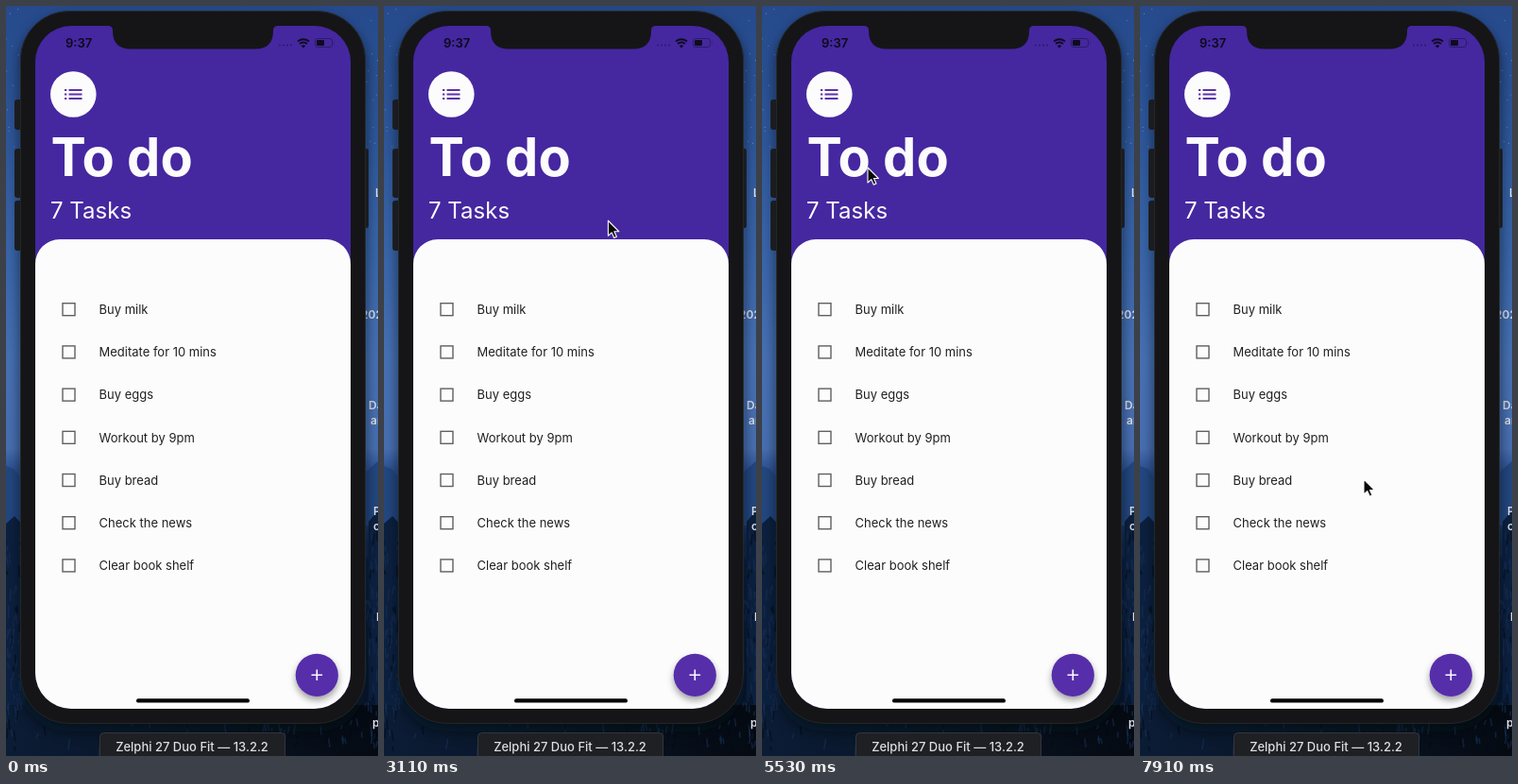
Animation, 394 px wide and 794 px high, one loop 8 s. Source, as an HTML page:

```html
<!DOCTYPE html>
<html lang="en">
<head>
<meta charset="utf-8">
<title>To do</title>
<style>
  html, body { margin: 0; width: 100%; height: 100%; overflow: hidden; background: #071426; }
  svg { display: block; width: 394px; height: 794px; font-family: Inter, "Noto Sans", sans-serif; }
  .edge { font-size: 12px; font-weight: 600; fill: #dcdfe6; }
  .tasks { font-size: 13px; fill: #202020; }
</style>
</head>
<body>
<svg viewBox="0 0 394 794">
  <defs>
    <linearGradient id="sky" x2="0" y2="1">
      <stop offset="0" stop-color="#264a8c"/>
      <stop offset=".16" stop-color="#2d5598"/>
      <stop offset=".34" stop-color="#3a66aa"/>
      <stop offset=".47" stop-color="#4771b4"/>
      <stop offset=".59" stop-color="#486fb2"/>
      <stop offset=".62" stop-color="#2c5090"/>
      <stop offset=".69" stop-color="#193766"/>
      <stop offset=".74" stop-color="#0b2044"/>
      <stop offset="1" stop-color="#081527"/>
    </linearGradient>
    <linearGradient id="ground">
      <stop offset="0" stop-color="#0b1c35"/>
      <stop offset=".6" stop-color="#081322"/>
      <stop offset="1" stop-color="#050a12"/>
    </linearGradient>
    <clipPath id="screen"><rect x="31" y="21" width="334" height="723" rx="38"/></clipPath>
    <filter id="soft" x="-20%" y="-20%" width="140%" height="140%"><feGaussianBlur stdDeviation="7"/></filter>
    <filter id="lift" x="-40%" y="-40%" width="180%" height="180%">
      <feDropShadow dx="0" dy="4" stdDeviation="3.5" flood-color="#000" flood-opacity=".38"/>
    </filter>
  </defs>

  <rect width="394" height="794" fill="url(#sky)"/>
  <path d="M0 487L8 490L20 505V550H0ZM394 482L386 489L374 500V550H394Z" fill="#234780"/>
  <path d="M0 548L9 540L20 552V794H0ZM394 534L384 546V794H394Z" fill="#0c2140"/>
  <rect y="740" width="394" height="54" fill="url(#ground)"/>
  <g id="scenery"></g>

  <g class="edge">
    <text x="391" y="202">L</text>
    <text x="376" y="331">202</text>
    <text x="384" y="427">Da</text>
    <text x="386" y="443">an</text>
    <text x="389" y="539">P</text>
    <text x="389" y="555">c</text>
    <text x="392" y="651">I</text>
    <text x="388" y="763">p</text>
  </g>

  <rect x="14" y="12" width="368" height="756" rx="52" fill="#04070d" opacity=".5" filter="url(#soft)"/>
  <path d="M9 102q0-3 3-3h5v32h-5q-3 0-3-3ZM9 154q0-3 3-3h5v52h-5q-3 0-3-3ZM9 209q0-3 3-3h5v53h-5q-3 0-3-3ZM379 151h3q2 0 2 2v80q0 2-2 2h-3Z" fill="#1b1c20"/>
  <rect x="15.5" y="5.5" width="365" height="754" rx="51" fill="#151517" stroke="#242529"/>

  <g clip-path="url(#screen)">
    <rect x="31" y="21" width="334" height="723" fill="#4527a0"/>
    <rect x="31" y="247" width="334" height="530" rx="26" fill="#fcfcfc"/>
    <path d="M108 21q5 0 5 5q0 19.5 19 19.5H264q19 0 19-19.5q0-5 5-5Z" fill="#151517"/>
  </g>

  <text x="63" y="44" font-size="13" font-weight="600" fill="#0c0a18">9:37</text>
  <g fill="#0f0b1e">
    <path d="M289 41.5h2m2 0h2m2 0h2m2 0h2" stroke="#2c1c66" stroke-width="1.6"/>
    <path d="M309 37.5q6-4.5 12 0M311 40q4-3 8 0" fill="none" stroke="#0f0b1e" stroke-width="1.8"/>
    <path d="M312.8 42.2q2.2-1.7 4.4 0l-2.2 2.3Z"/>
    <rect x="327.5" y="34.5" width="18" height="9" rx="2.5" fill="none" stroke="#2c1c66"/>
    <rect x="329" y="36" width="8" height="6" rx="1"/>
    <path d="M347 37.5q1.5 1.5 0 3Z" fill="#2c1c66"/>
  </g>

  <circle cx="71.3" cy="93.5" r="24.3" fill="#fcfcfc"/>
  <path d="M62 89h2.3m2.2 0h14M62 93.5h2.3m2.2 0h14M62 98h2.3m2.2 0h14" stroke="#5a32ac" stroke-width="2"/>
  <g fill="#fcfcfc">
    <text x="47.5" y="179.5" font-size="56" font-weight="700">To do</text>
    <text x="47" y="225" font-size="24">7 Tasks</text>
  </g>

  <g class="tasks" id="tasks"></g>

  <circle cx="329.3" cy="708.3" r="22.6" fill="#562eaa" filter="url(#lift)"/>
  <path d="M323.5 708.3h11.6m-5.8-5.8v11.6" stroke="#fcfcfc" stroke-width="1.6"/>
  <rect x="138" y="733.2" width="120" height="4.4" rx="2.2" fill="#050505"/>

  <rect x="99.5" y="769.5" width="196" height="32" rx="4" fill="#1f2024" stroke="#34363b"/>
  <text x="197" y="789" font-size="13" font-weight="500" text-anchor="middle" fill="#dedee0">Zelphi 27 Duo Fit — 13.2.2</text>

  <path id="cursor" d="M0 0V16L3.8 12.6L6.3 18.2L9 17L6.5 11.5H11.4Z" fill="#080808" stroke="#fcfcfc" stroke-width="1.1" stroke-linejoin="round"/>
</svg>
<script>
  const byId = id => document.getElementById(id);
  const loop = 8000;

  const tasks = ["Buy milk", "Meditate for 10 mins", "Buy eggs", "Workout by 9pm",
                 "Buy bread", "Check the news", "Clear book shelf"];
  byId("tasks").innerHTML = tasks.map((task, i) => {
    const y = 321.2 + i * 45.2;
    return `<rect x="60" y="${y - 6.5}" width="13" height="13" fill="none" stroke="#606060" stroke-width="1.4"/>
      <text x="98.5" y="${y + 4.7}">${task}</text>`;
  }).join("");

  let seed = 11;
  const random = () => (seed = seed * 16807 % 2147483647) / 2147483647;

  // Sparse stars above, mottled grass along the sides and bottom.
  let scenery = "";
  for (let i = 0; i < 22; i++) {
    const x = i % 2 ? random() * 14 : 382 + random() * 12;
    scenery += `<circle cx="${x}" cy="${random() * 180}" r=".6" fill="#8fa8d4" opacity=".6"/>`;
  }
  for (let i = 0; i < 170; i++) {
    const low = i % 3 === 0;
    const x = low ? random() * 394 : i % 2 ? random() * 16 : 380 + random() * 14;
    const y = low ? 758 + random() * 36 : 565 + random() * 225;
    const color = ["#16335c", "#1c2f58", "#040a14"][i % 7 % 3];
    scenery += `<path d="M${x} ${y}l${random() * 4 - 2} ${-4 - random() * 9}"
      stroke="${color}" stroke-width="1.5" opacity=".6"/>`;
  }
  byId("scenery").innerHTML = scenery;

  // Pointer stops: time, x, y.
  const stops = [
    [2850, 394, 330], [3300, 141, 164], [4250, 141, 164],
    [4750, 112, 171], [6850, 112, 171], [7500, 237, 501], [loop, 237, 501]
  ];
  const ease = p => p * p * (3 - 2 * p);

  function draw(now) {
    const time = now % loop;
    const next = stops.findIndex(stop => stop[0] > time);
    const cursor = byId("cursor");
    cursor.style.display = next > 0 ? "" : "none";
    if (next > 0) {
      const [t0, x0, y0] = stops[next - 1], [t1, x1, y1] = stops[next];
      const p = ease((time - t0) / (t1 - t0));
      cursor.setAttribute("transform", `translate(${x0 + (x1 - x0) * p} ${y0 + (y1 - y0) * p})`);
    }
    requestAnimationFrame(draw);
  }
  draw(performance.now());
</script>
</body>
</html>
```
